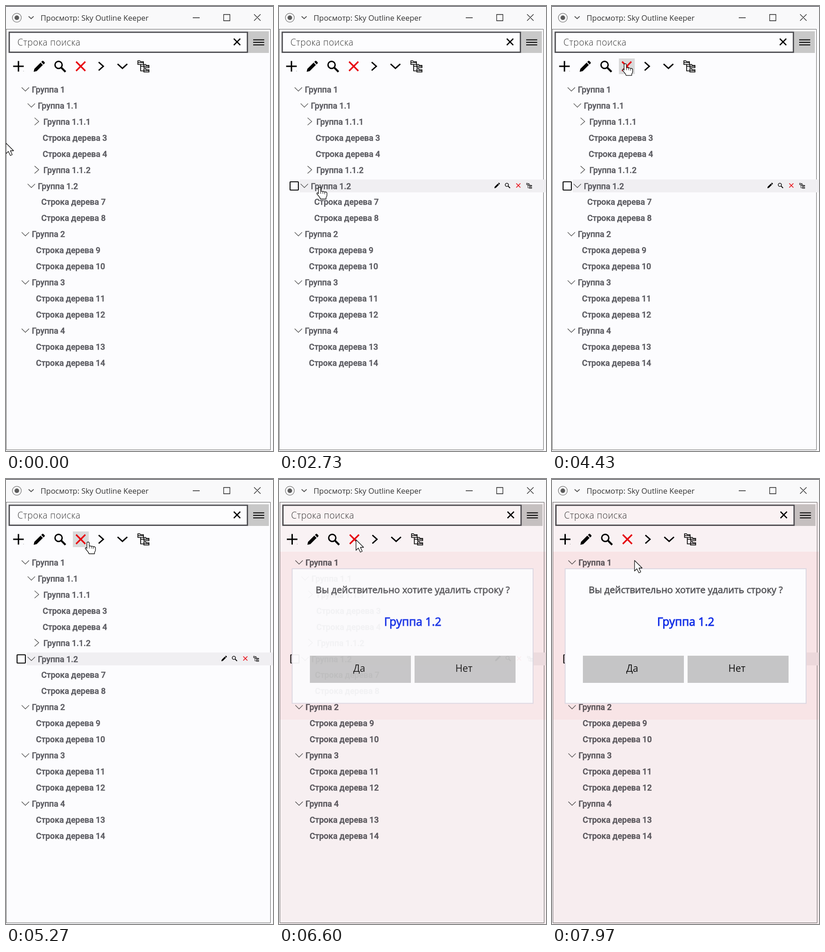
These frames come from a looping animation (579x967 px, 8000 ms). An HTML page:

```html
<!DOCTYPE html>
<html lang="ru">
<head>
<meta charset="utf-8">
<style>
html, body { margin: 0; width: 100%; height: 100%; overflow: hidden; background: #fcfcfe; }
svg { display: block; width: 579px; height: 967px; }
.ln { fill: none; stroke: var(--c, #000); }
.ui { font-family: "Open Sans", "Noto Sans", sans-serif; }
.tree { --c: #444; font: 500 17.9px Roboto, sans-serif; fill: #5c5c62; stroke: #5c5c62; stroke-width: .5px; }
#tint { mix-blend-mode: multiply; }
</style>
</head>
<body>
<svg viewBox="0 0 579 967">
  <defs>
    <path id="pencil" d="M-12 12l1.5-6.5L3-8l5 5L-5.500 10.500zM4.500-9.500l2-2q1.500-1 3 .5l2 2q1.500 1.500 0 3l-2 2z"/>
    <g id="lens" class="ln" stroke-width="3"><circle cx="-3" cy="-3" r="7.700"/><path d="M3 3l9 9" stroke-width="4"/></g>
    <path id="cross" d="M-10-10L10 10M10-10L-10 10" fill="none" stroke="#e8000c" stroke-width="3.200"/>
    <path id="nodes" class="ln" stroke-width="1.700" d="M-12-4v-8h4l2 2h6v6zM-12-8h12M1 3v-7h4l1 2h6v5zM1 0h11M1 12.500v-7h4l1 2h6v5zM1 9.500h11M-6-4v14h7M-6 0h7"/>
    <path id="down" class="ln" d="M-8-4.500L0 3.500 8-4.500" stroke-width="1.200"/>
    <path id="right" class="ln" d="M-5-8.500L4-.5-5 7.500" stroke-width="1.200"/>
  </defs>

  <rect width="579" height="967" fill="#fcfcfe"/>
  <g id="app">
    <rect x="-2" y="51" width="581" height="916" fill="#fcfcfe"/>
    <path class="ln" d="M0 50.500H573.500V964.500H.5V50" style="--c:#666"/>

    <rect x="525" y="55" width="45" height="47" fill="#c8c8c8"/>
    <path class="ln" d="M536 73.500h24M536 79h24M536 84.500h24" stroke-width="2"/>
    <rect x="7" y="57" width="516.500" height="43.500" fill="#fdfdfe" stroke="#4c4c50" stroke-width="2.800"/>
    <text class="ui" x="24.800" y="85.500" font-size="19.500" font-weight="300" letter-spacing=".4" fill="#333">Строка поиска</text>
    <path class="ln" d="M494 71l14 14M508 71l-14 14" stroke-width="2.500"/>

    <rect id="press" x="145" y="114" width="34.500" height="34" fill="#d9d9da"/>
    <path class="ln" d="M27 119.500v23M15.500 131h23" stroke-width="3"/>
    <rect x="37.500" y="141" width="1" height="1" fill="#777"/>
    <use href="#pencil" x="72" y="131"/>
    <use href="#lens" x="117" y="131"/>
    <use href="#cross" x="162" y="131"/>
    <path class="ln" d="M201 122l10 9-10 9M242 126l10.500 9.500L263 126" stroke-width="3"/>
    <use href="#nodes" x="298" y="131"/>

    <rect id="hover" x="18" y="377" width="561" height="28" fill="#dfdfe0"/>
    <g id="picked">
      <rect x="18" y="377" width="27" height="28" fill="#fcfcfe"/>
      <rect x="45" y="377" width="534" height="28" fill="#f0eff2"/>
      <rect x="24" y="382" width="18" height="18" rx="1" fill="#fdfdfe" stroke="#111" stroke-width="2.200"/>
      <use href="#pencil" transform="translate(473 390) scale(.5)"/>
      <use href="#lens" transform="translate(495.500 390) scale(.46)"/>
      <use href="#cross" transform="translate(519 390) scale(.45)"/>
      <use href="#nodes" transform="translate(542.500 390.500) scale(.47)"/>
    </g>
    <g id="tree" class="tree"></g>
    <g id="tint">
      <rect y="51" width="579" height="107" fill="#fcf4f4"/>
      <rect y="158" width="579" height="365" fill="#fbe7e7"/>
      <rect y="523" width="579" height="444" fill="#faf0f0"/>
    </g>
  </g>

  <g id="dialog" class="ui" text-anchor="middle">
    <rect x="28.500" y="195" width="522.500" height="292.500" fill="#fcfcfe" stroke="#dcd8e2" stroke-width="2"/>
    <text x="290" y="247.500" font-size="20.300" fill="#59595d" stroke="#59595d" stroke-width=".8">Вы действительно хотите удалить строку ?</text>
    <text x="290" y="319" font-size="24.600" fill="#1430e6" stroke="#1430e6" stroke-width="1">Группа 1.2</text>
    <path d="M67 384h219v59H67zM294 384h219v59H294z" fill="#c5c5c6"/>
    <g font-size="21" fill="#111"><text x="174" y="419">Да</text><text x="401" y="419">Нет</text></g>
  </g>

  <rect width="579" height="50" fill="#f9f9fa"/>
  <rect width="579" height="1.300" fill="#33333a"/>
  <circle cx="23.500" cy="25.500" r="9.700" fill="none" stroke="#777" stroke-width="1.300"/>
  <circle cx="23.500" cy="25.500" r="5" fill="#5c5c5c"/>
  <path class="ln" d="M49 22.500l5.500 5 5.500-5" style="--c:#555" stroke-width="1.800"/>
  <text class="ui" x="75" y="32" font-size="16.500" fill="#333">Просмотр: Sky Outline Keeper</text>
  <path class="ln" d="M405 25.500h15M472 18.500h13.500v13.500H472zM538 18l14 14M552 18l-14 14" style="--c:#222" stroke-width="1.300"/>

  <g id="cursor" fill="#fff" stroke="#111" stroke-width="1.300" stroke-linejoin="round">
    <path id="arrow" d="M0 0V23l5-5 4.500 9 4-2-4-8.500h7z"/>
    <g id="hand">
      <path d="M-2.500 2Q-2.500 0 0 0T2.500 2V9Q5 7.500 7 9.500 9 8 11 10.500 14 9 16 12V17Q16 20 14 22V25.500H2Q1 22-2 19L-6 14Q-6 11-3.500 12.500L-2.500 14z"/>
      <path d="M2.500 9v5M7 10v4M11 11v4" stroke-width="1"/>
    </g>
  </g>
</svg>
<script>
const $ = id => document.getElementById(id);
const LOOP = 8000;

// chevron kind, text x, label
const rows = [
  ['down', 56, 'Группа 1'], ['down', 69, 'Группа 1.1'], ['right', 81, 'Группа 1.1.1'],
  ['', 79.5, 3], ['', 79.5, 4], ['right', 81, 'Группа 1.1.2'],
  ['down', 69, 'Группа 1.2'], ['', 76.5, 7], ['', 76.5, 8],
  ['down', 56, 'Группа 2'], ['', 65, 9], ['', 65, 10],
  ['down', 56, 'Группа 3'], ['', 65, 11], ['', 65, 12],
  ['down', 56, 'Группа 4'], ['', 65, 13], ['', 65, 14]
];
$('tree').innerHTML = rows.map(([kind, x, label], i) => {
  const y = 181.5 + i * 34.95;
  const mark = kind && `<use href="#${kind}" x="${x - 14}" y="${y}"/>`;
  return `${mark}<text x="${x}" y="${y + 6.3}">${kind ? label : 'Строка дерева ' + label}</text>`;
}).join('');

// cursor tip: time, x, y
const track = [
  [30, 0, 298], [1000, 88, 394], [2730, 88, 394], [3400, 156, 123], [4270, 156, 123],
  [5100, 185, 148], [5270, 178, 137], [6430, 178, 137], [6460, 167, 132],
  [7270, 167, 132], [7970, 179, 177]
];
const ramp = (t, a, b) => Math.min(1, Math.max(0, (t - a) / (b - a)));
const smooth = p => p * p * (3 - 2 * p);

function tip(t) {
  let [, x, y] = track[0];
  for (let i = 1; i < track.length; i++) {
    const [a, x0, y0] = track[i - 1], [b, x1, y1] = track[i];
    const p = smooth(ramp(t, a, b));
    x += (x1 - x0) * p;
    y += (y1 - y0) * p;
  }
  return [x, y];
}

function draw(now) {
  const t = now % LOOP;
  const [x, y] = tip(t);
  const hand = (t > 870 && t < 2760) || (t > 3570 && t < 6440);
  $('cursor').setAttribute('transform', `translate(${x} ${y})`);
  $('hand').style.opacity = +hand;
  $('arrow').style.opacity = +!hand;

  $('hover').style.opacity = ramp(t, 840, 1000) * (1 - ramp(t, 1830, 1840));
  $('picked').style.opacity = ramp(t, 1500, 1830);
  $('press').style.opacity = ramp(t, 3570, 3670) * (1 - ramp(t, 6430, 6470));

  $('dialog').style.opacity = Math.sin(Math.PI / 2 * ramp(t, 6430, 6650));
  $('tint').style.opacity = ramp(t, 6430, 6630);
  $('app').setAttribute('transform', `translate(${1.5 * ramp(t, 6430, 6540)} 0)`);
  requestAnimationFrame(draw);
}
requestAnimationFrame(draw);
</script>
</body>
</html>
```
